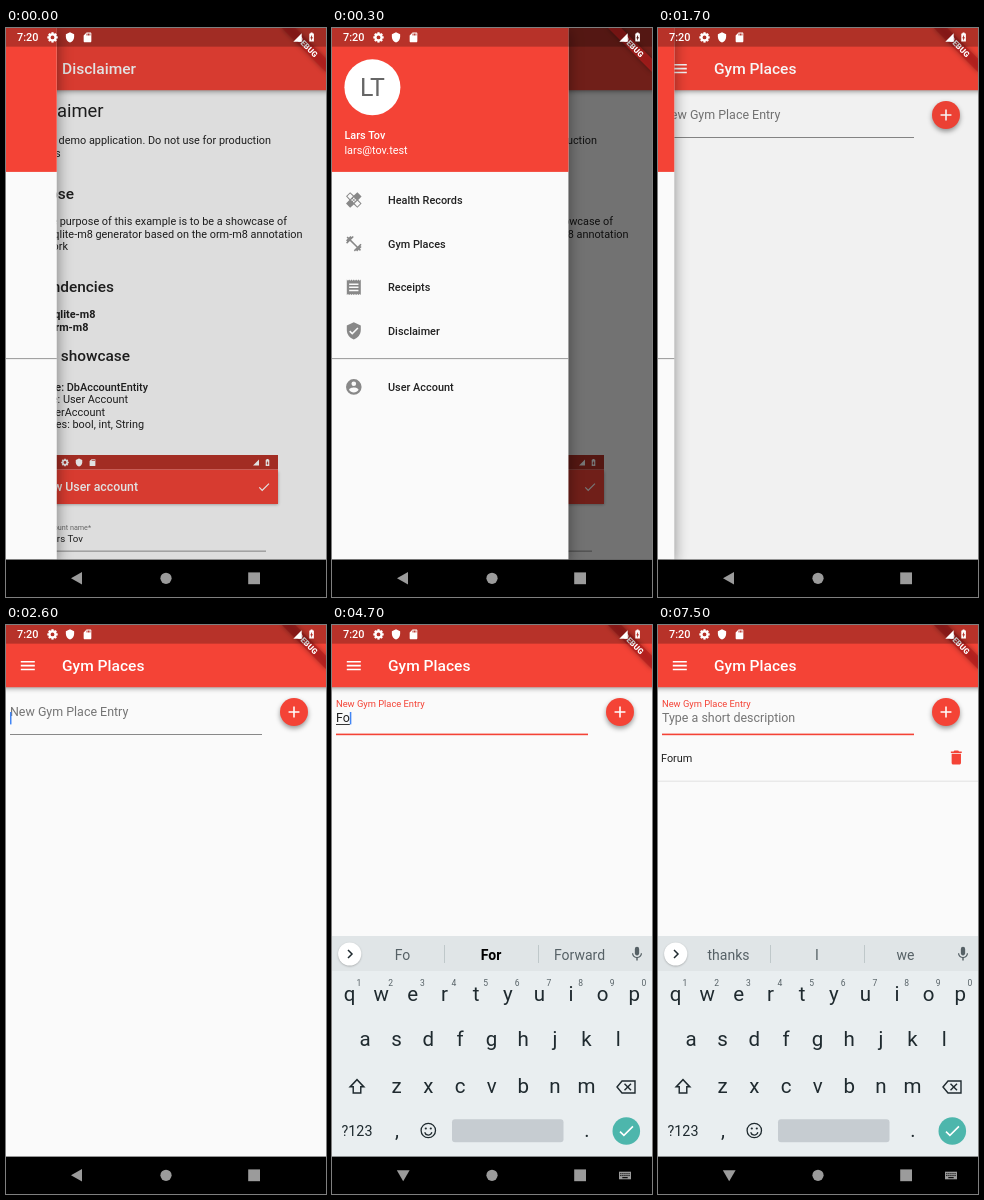
An HTML page with a canvas for the animation above (8000 ms loop, 320x569 px).

```html
<!DOCTYPE html>
<html lang="en">
<head>
<meta charset="utf-8">
<title>Gym Places</title>
<style>
html, body { margin: 0; width: 100%; height: 100%; overflow: hidden; background: #000; }
canvas { display: block; width: 320px; height: 569px; }
</style>
</head>
<body>
<canvas></canvas>
<script>
const W = 320, H = 569, LOOP = 8000, DP = 320 / 411.43;
const RED = '#f44336', PAGE = '#fafafa', INK = 'rgba(0,0,0,.87)', GREY = '#757575';
const DRAWER = 304 * DP, NAV_TOP = 531.6;
const USER = { name: 'Lars Tov', mail: 'lars@tov.test', initials: 'LT' };

const canvas = document.querySelector('canvas');
const ratio = window.devicePixelRatio || 1;
canvas.width = W * ratio;
canvas.height = H * ratio;
const c = canvas.getContext('2d');

// Icons on a 24 x 24 grid
const ICONS = {
  healing: 'M17.7 12L22 7.4 16.6 2 12 6.3 7.3 2 2 7.3 6.3 12 2 16.6 7.3 22 12 17.7 16.6 22 22 16.6zM3.7 7.3L7.3 3.7 10.9 7.3 7.3 11zM13 16.6L16.6 13 20.3 16.6 16.6 20.3zM11 9h2v2h-2zM9 11h2v2H9zM13 11h2v2h-2zM11 13h2v2h-2z',
  gym: 'M20.57 14.86L22 13.43 20.57 12 17 15.57 8.43 7 12 3.43 10.57 2 9.14 3.43 7.71 2 5.57 4.14 4.14 2.71 2.71 4.14l1.43 1.43L2 7.71l1.43 1.43L2 10.57 3.43 12 7 8.43 15.57 17 12 20.57 13.43 22l1.43-1.43L16.29 22l2.14-2.14 1.43 1.43 1.43-1.43-1.43-1.43L22 16.29z',
  receipt: 'M18 17H6v-2h12zM18 13H6v-2h12zM18 9H6V7h12zM3 22l1.5-1.5L6 22l1.5-1.5L9 22l1.5-1.5L12 22l1.5-1.5L15 22l1.5-1.5L18 22l1.5-1.5L21 22V2l-1.5 1.5L18 2l-1.5 1.5L15 2l-1.5 1.5L12 2l-1.5 1.5L9 2 7.5 3.5 6 2 4.5 3.5 3 2z',
  shield: 'M12 1L3 5v6c0 5.55 3.84 10.74 9 12 5.16-1.26 9-6.45 9-12V5z',
  verified: 'M12 1L3 5v6c0 5.55 3.84 10.74 9 12 5.16-1.26 9-6.45 9-12V5zM10 17l-4-4 1.41-1.41L10 14.17l6.59-6.59L18 9z',
  account: 'M12 2a10 10 0 1 0 0 20a10 10 0 1 0 0-20zM12 5a3 3 0 1 1 0 6a3 3 0 1 1 0-6zM12 19.2c-2.5 0-4.71-1.28-6-3.22.03-1.99 4-3.08 6-3.08s5.97 1.09 6 3.08c-1.29 1.94-3.5 3.22-6 3.22z',
  trash: 'M6 19c0 1.1.9 2 2 2h8c1.1 0 2-.9 2-2V7H6zM19 4h-3.5l-1-1h-5l-1 1H5v2h14z',
  check: 'M9 16.17L4.83 12l-1.42 1.41L9 19 21 7l-1.41-1.41z',
  sd: 'M18 2h-8L4 8v12c0 1.1.9 2 2 2h12c1.1 0 2-.9 2-2V4c0-1.1-.9-2-2-2zM12 8h-2V4h2zM15 8h-2V4h2zM18 8h-2V4h2z',
  mic: 'M12 14c1.66 0 3-1.34 3-3V5a3 3 0 0 0-6 0v6c0 1.66 1.34 3 3 3zM17.3 11c0 3-2.54 5.1-5.3 5.1S6.7 14 6.7 11H5c0 3.41 2.72 6.23 6 6.72V21h2v-3.28c3.28-.48 6-3.3 6-6.72z',
  signal: 'M2 22h20V2z',
  battery: 'M15.7 4H14V2h-4v2H8.300L7 5.300V22h10V5.300zM11 20v-5.500H9L13 7v5.500h2z',
  menu: 'M3 18h18v-2H3zM3 13h18v-2H3zM3 8h18V6H3z',
  plus: 'M19 13h-6v6h-2v-6H5v-2h6V5h2v6h6z',
  shift: 'M12 3L2.500 13H7v7h10v-7h4.500zM12 5.500L17.500 11.400H15.400V18.400H8.600V11.400H6.500z'
};
for (const key in ICONS) ICONS[key] = new Path2D(ICONS[key]);

const clamp = v => Math.min(1, Math.max(0, v));
const smooth = v => { v = clamp(v); return v * v * (3 - 2 * v); };
// Remaining distance of a critically damped spring
const spring = x => (1 + .955 * x) * Math.exp(-x);

function rect(x, y, w, h, color) {
  c.fillStyle = color;
  c.fillRect(x, y, w, h);
}

function circle(x, y, r, color) {
  c.fillStyle = color;
  c.beginPath();
  c.arc(x, y, r, 0, 7);
  c.fill();
}

function line(points, color, width = 1.2, close = false) {
  c.strokeStyle = color;
  c.lineWidth = width;
  c.beginPath();
  points.forEach(([x, y]) => c.lineTo(x, y));
  if (close) c.closePath();
  c.stroke();
}

function polygon(points, color) {
  c.fillStyle = color;
  c.beginPath();
  points.forEach(([x, y]) => c.lineTo(x, y));
  c.fill();
}

function text(s, x, y, size, color = INK, weight = 400, align = 'left') {
  c.font = `${weight} ${size}px Roboto, sans-serif`;
  c.textAlign = align;
  c.fillStyle = color;
  c.fillText(s, x, y);
}

function icon(name, x, y, color, scale = DP) {
  c.save();
  c.translate(x - 12 * scale, y - 12 * scale);
  c.scale(scale, scale);
  c.fillStyle = color;
  c.fill(ICONS[name], 'evenodd');
  c.restore();
}

function withShadow(blur, dy, alpha, draw) {
  c.save();
  c.shadowColor = `rgba(0,0,0,${alpha})`;
  c.shadowBlur = blur * ratio;
  c.shadowOffsetY = dy * ratio;
  draw();
  c.restore();
}

function faded(alpha, draw) {
  c.save();
  c.globalAlpha *= alpha;
  draw();
  c.restore();
}

function gear(x, y, r, color) {
  for (let i = 0; i < 4; i++) {
    const a = i * Math.PI / 4, dx = Math.cos(a) * r, dy = Math.sin(a) * r;
    line([[x - dx, y - dy], [x - dx * .55, y - dy * .55]], color, r * .42);
    line([[x + dx, y + dy], [x + dx * .55, y + dy * .55]], color, r * .42);
  }
  c.lineWidth = r * .42;
  c.beginPath();
  c.arc(x, y, r * .58, 0, 7);
  c.stroke();
}

function appBar(title, hasMenu) {
  withShadow(5, 2, .4, () => rect(-8, 0, W + 16, 62.2, RED));
  if (hasMenu) icon('menu', 21.8, 40.6, '#fff');
  text(title, 56, 46.4, 20 * DP, '#fff', 500);
}

function accountPreview() {
  rect(12, 427, 260, 14.500, '#b73228');
  withShadow(3, 1, .35, () => rect(12, 441.500, 260, 34.500, RED));
  gear(59, 434.500, 3.800, '#fff');
  icon('shield', 73, 434.500, '#fff', .36);
  icon('sd', 86.500, 434.500, '#fff', .36);
  icon('signal', 250, 434.500, '#fff', .3);
  icon('battery', 261.500, 434.500, '#fff', .36);
  text('New User account', 132, 463, 12.300, '#fff', 500, 'right');
  icon('check', 258, 459, '#fff', .6);
  text('Account name*', 85, 501.500, 7.200, GREY, 400, 'right');
  text(USER.name, 77, 514, 9.700, INK, 400, 'right');
  rect(24, 522.700, 236, .8, '#777');
}

function disclaimerPage() {
  appBar('Disclaimer', true);
  const right = (s, x, y, size = 14 * DP, weight = 400) => text(s, x, y, size, INK, weight, 'right');
  right('Disclaimer', 97.500, 89, 18.400);
  right('This is a demo application. Do not use for production', 265, 116);
  right('purposes', 54.500, 128.500);
  right('Purpose', 68, 171, 15.400, 500);
  right('The purpose of this example is to be a showcase of', 281, 197);
  right('sqlite-m8 generator based on the orm-m8 annotation', 296.500, 209.500);
  right('framework', 62, 222);
  right('Dependencies', 108, 263.500, 15.400, 500);
  right('sqlite-m8', 89.500, 290, 14 * DP, 700);
  right('orm-m8', 82.500, 302.500, 14 * DP, 700);
  right('Model showcase', 124, 332.500, 15.400, 500);
  right('Name: DbAccountEntity', 142, 362.500, 14 * DP, 500);
  right('Title: User Account', 122, 375);
  right('UserAccount', 99, 387.500);
  right('Types: bool, int, String', 138, 400);
  accountPreview();
}

function typedText(t) {
  if (t < 4100 || t >= 6800) return '';
  return 'Forum'.slice(0, 1 + [4700, 4800, 5100, 5600].filter(at => t >= at).length);
}

function gymPage(t) {
  appBar('Gym Places', true);
  const focus = smooth((t - 2600) / 200);
  const hint = t < 6800 ? focus * (1 - smooth((t - 4100) / 200)) : smooth((t - 6800) / 200);
  const typed = typedText(t);

  const labelColor = focus ? RED : GREY;
  text('New Gym Place Entry', 4, 91.400 - 9.400 * focus, 16 * DP * (1 - .25 * focus), labelColor);
  faded(hint, () => text('Type a short description', 4, 97.400, 16 * DP, GREY));
  rect(4, 109, 252, 1, '#888');
  if (focus) rect(130 - 126 * focus, 108.600, 252 * focus, 1.600, RED);

  text(typed, 4, 97.400, 16 * DP);
  const end = 4 + c.measureText(typed).width;
  if (typed) rect(4, 99, end - 4, .9, '#222');
  const caretOn = (t >= 2600 && t < 3100) || (t >= 4100 && t < 6100) || (t >= 6500 && t < 7500);
  if (caretOn) rect(end, 87, 1.500, 12.400, '#4285f4');

  withShadow(5, 2.500, .4, () => circle(288, 87, 14, RED));
  if (t >= 6700 && t < 7000) {
    const p = (t - 6600) / 300;
    circle(288, 87, Math.min(14, 6 + 14 * p), `rgba(255,255,255,${.34 - .26 * p})`);
  }
  icon('plus', 288, 87, '#fff');

  if (t >= 6800) {
    text('Forum', 3, 137, 14 * DP);
    icon('trash', 298.300, 132.600, RED);
    rect(0, 155.700, W, .9, '#dedede');
  }
}

function suggestions(t) {
  if (t < 4200 || t >= 6900) return ['thanks', 'I', 'we'];
  if (t < 4700) return ['F', 'For', 'First'];
  if (t < 4800) return ['Fo', 'For', 'Forward'];
  if (t < 5100) return ['For', 'Forget', 'Forward'];
  if (t < 5600) return ['Foru', 'Forum', 'Forums'];
  return ['Forum', 'Forums', "Forum's"];
}

function keyboard(t) {
  const dark = '#1f2a2f', soft = '#566166', pitch = 31.650;
  c.save();
  c.translate(0, (NAV_TOP - 311) * Math.pow(1 - clamp((t - 2700) / 400), 2));
  rect(0, 311, W, 260, '#e9eef0');
  rect(0, 311, W, 35, '#e0e5e7');
  withShadow(2, .8, .25, () => circle(17.700, 329, 11.600, '#fff'));
  line([[16, 325], [20, 329], [16, 333]], dark, 1.500);
  rect(112, 320, .9, 18, '#bcc4c7');
  rect(206, 320, .9, 18, '#bcc4c7');
  const typing = t >= 4200 && t < 6900;
  suggestions(t).forEach((word, i) => {
    const strong = typing && i === 1;
    text(word, [70.500, 159, 247.500][i], 334.500, 14, strong ? '#000' : soft, strong ? 700 : 400, 'center');
  });
  icon('mic', 305, 329, soft, .72);

  const row = (keys, x, y) => [...keys].forEach((key, i) =>
    text(key, x + i * pitch, y, 20.500, dark, 400, 'center'));
  row('qwertyuiop', 17.500, 376);
  row('asdfghjkl', 33, 421);
  row('zxcvbnm', 64.700, 467.500);
  [...'1234567890'].forEach((n, i) => text(n, 27 + i * pitch, 360.500, 8.500, soft, 400, 'center'));

  icon('shift', 25, 461.500, dark, .9);
  line([[285, 462], [290, 456], [303, 456], [303, 468], [290, 468]], dark, 1.400, true);
  line([[292.500, 458.800], [299, 465.200]], dark, 1.400);
  line([[299, 458.800], [292.500, 465.200]], dark, 1.400);

  text('?123', 25, 511, 14.300, dark, 400, 'center');
  text(',', 65, 512, 20, dark, 400, 'center');
  text('.', 255, 512, 20, dark, 400, 'center');
  c.strokeStyle = dark;
  c.lineWidth = 1.300;
  c.beginPath();
  c.arc(96.300, 505.500, 7.200, 0, 7);
  c.stroke();
  c.beginPath();
  c.arc(96.300, 506.300, 3.700, .25, Math.PI - .25);
  c.stroke();
  circle(93.800, 503.500, 1.100, dark);
  circle(98.800, 503.500, 1.100, dark);
  c.fillStyle = '#c6ccd1';
  c.beginPath();
  c.roundRect(120, 494.300, 111.500, 23, 3);
  c.fill();
  circle(294.300, 506, 13.800, '#4db6ac');
  icon('check', 294.300, 506, '#fff', .8);
  c.restore();
}

function drawer(open) {
  rect(0, 0, W, NAV_TOP, `rgba(0,0,0,${.54 * open})`);
  c.save();
  c.translate(DRAWER * (open - 1), 0);
  withShadow(14, 4, .45, () => rect(0, 0, DRAWER, NAV_TOP, PAGE));
  rect(0, 0, DRAWER, 143.900, RED);
  circle(40.400, 59.300, 28, '#fff');
  text(USER.initials, 40.400, 68.300, 32 * DP, '#666', 400, 'center');
  text(USER.name, 12.400, 110.600, 14 * DP, '#fff', 500);
  text(USER.mail, 12.400, 126, 14 * DP, '#fff');
  const items = [
    ['healing', 'Health Records', 172], ['gym', 'Gym Places', 215.700],
    ['receipt', 'Receipts', 259.300], ['verified', 'Disclaimer', 302.900],
    ['account', 'User Account', 358.900]
  ];
  for (const [name, label, y] of items) {
    icon(name, 21.800, y, '#888');
    text(label, 56, y + 4, 14 * DP, INK, 500);
  }
  rect(0, 330.200, DRAWER, .9, '#8d8d8d');
  c.restore();
}

function debugBanner() {
  c.save();
  c.translate(W, 0);
  c.rotate(Math.PI / 4);
  withShadow(5, 0, .5, () => rect(-40 * DP, 28 * DP, 80 * DP, 12 * DP, 'rgba(183,28,28,.72)'));
  text('DEBUG', 0, 34 * DP + 2.900, 10.200 * DP, '#fff', 900, 'center');
  c.restore();
}

function statusBar() {
  rect(0, 0, W, 24 * DP, 'rgba(0,0,0,.25)');
  text('7:20', 11, 13.300, 14 * DP, '#fff', 500);
  gear(46.500, 9.400, 5.200, '#fff');
  icon('shield', 64, 9.400, '#fff', .46);
  icon('sd', 81.500, 9.400, '#fff', .48);
  icon('signal', 291.500, 9.500, '#fff', .42);
  icon('battery', 305.600, 9, '#fff', .46);
}

function navBar(withKeyboard) {
  const color = '#9b9b9b';
  rect(0, NAV_TOP, W, H - NAV_TOP, '#000');
  polygon(withKeyboard
    ? [[64.800, 545.300], [77.600, 545.300], [71.200, 556.300]]
    : [[65, 550.300], [76, 544], [76, 556.600]], color);
  circle(160, 550.300, 5.600, color);
  rect(242.200, 544.400, 11.800, 11.800, color);
  if (!withKeyboard) return;
  rect(287, 546.700, 12, 7.600, color);
  for (let i = 0; i < 5; i++) {
    rect(288.300 + i * 2.050, 548.100, 1.100, 1.100, '#000');
    rect(288.300 + i * 2.050, 550, 1.100, 1.100, '#000');
  }
  rect(290.300, 552.100, 5.400, 1.100, '#000');
}

function drawerOpen(t) {
  if (t < 300) return 1 - spring(.82 + .02236 * t);
  if (t < 1600) return 1;
  return t < 1900 ? spring(2.070 + .02236 * (t - 1600)) : 0;
}

function draw(now) {
  const t = Math.floor(now % LOOP / 100) * 100;
  c.setTransform(ratio, 0, 0, ratio, 0, 0);
  rect(0, 0, W, H, PAGE);
  if (t < 1600) disclaimerPage();
  else gymPage(t);
  const open = drawerOpen(t);
  if (open) drawer(open);
  debugBanner();
  if (t >= 2800) keyboard(t);
  statusBar();
  navBar(t >= 2800);
}

const start = performance.now();
function tick() {
  draw(performance.now() - start);
  requestAnimationFrame(tick);
}
tick();
</script>
</body>
</html>
```
